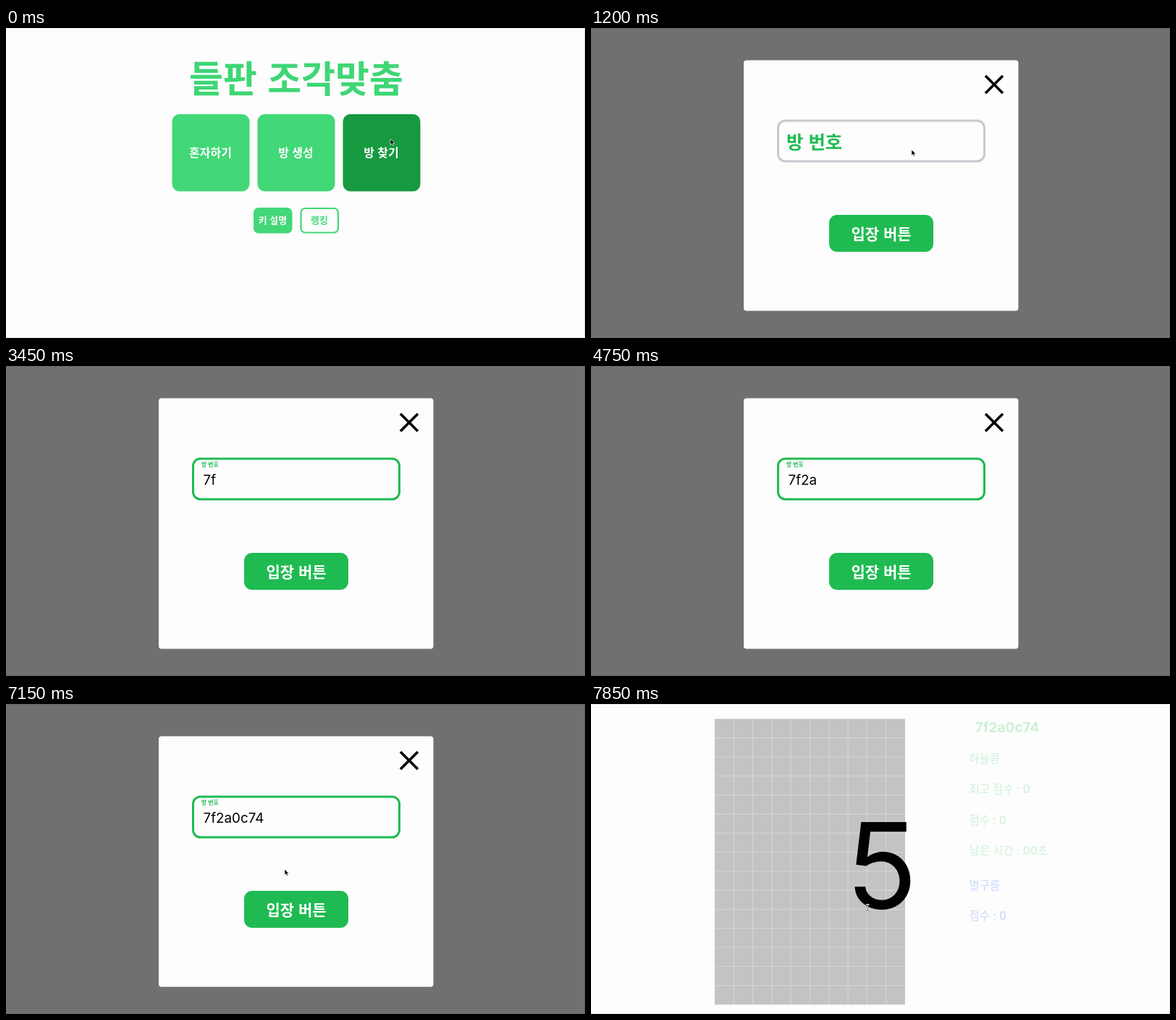
An HTML page for the animation above (8 s loop, 800 by 428 pixels).

```html
<!DOCTYPE html>
<html lang="ko">
<head>
<meta charset="utf-8">
<style>
  html, body { margin: 0; width: 100%; height: 100%; overflow: hidden; background: #fdfdfd; }
  svg { display: block; width: 100vw; height: 100vh; }
  text { font-family: "Noto Sans CJK KR", "Noto Sans CJK", "Noto Sans CJK JP", sans-serif; font-weight: 700; }
  .mid { text-anchor: middle; }
  .inter { font-family: Inter, "Noto Sans CJK KR", "Noto Sans CJK", "Noto Sans CJK JP", sans-serif; }
  .thin { font-weight: 400; }
  .info text { font-size: 15.5px; font-weight: 500; }
</style>
</head>
<body>
<svg viewBox="0 0 800 428">
  <rect width="800" height="428" fill="#fdfdfd"/>
  <path d="M0 .5H799.5V427.5H0" fill="none" stroke="#e6e6e6"/>

  <g id="home">
    <text class="mid" x="401" y="89" font-size="51" fill="#3fd675">들판 조각맞춤</text>
    <g fill="#42d777">
      <rect x="229.5" y="119" width="107" height="106.5" rx="10"/>
      <rect x="347.5" y="119" width="107" height="106.5" rx="10"/>
      <rect x="465.5" y="119" width="107" height="106.5" rx="10" fill="#16993f"/>
      <rect x="342" y="248" width="53.5" height="35.5" rx="7"/>
    </g>
    <rect x="407.5" y="249" width="51.5" height="33.5" rx="6" fill="none" stroke="#42d777" stroke-width="2.2"/>
    <g class="mid" fill="#fff" font-size="16">
      <text x="282.5" y="178">혼자하기</text>
      <text x="400.5" y="178">방 생성</text>
      <text x="518.5" y="178">방 찾기</text>
      <text x="368.5" y="270" font-size="13">키 설명</text>
      <text x="433" y="270" font-size="13" fill="#42d777">랭킹</text>
    </g>
  </g>

  <rect id="shade" width="800" height="428" fill="#000" fill-opacity=".555"/>
  <g id="dialog">
    <rect x="211" y="44.5" width="379.5" height="346" rx="4" fill="#fdfdfd"/>
    <path d="M545 66L569 90M569 66L545 90" stroke="#000" stroke-width="3.7"/>
    <rect id="field" x="258.5" y="128" width="285" height="56" rx="10" fill="none" stroke-width="3"/>
    <text id="label" x="270" fill="#1fbb52">방 번호</text>
    <text id="code" class="inter thin" x="272.5" y="164" font-size="18.8"></text>
    <rect id="enter" x="329" y="258" width="144" height="51" rx="11"/>
    <text class="mid" x="401" y="291.5" font-size="21" fill="#fff">입장 버튼</text>
  </g>

  <g id="game">
    <rect x="171" y="20.5" width="263" height="394.5" fill="#c3c3c3"/>
    <path id="grid" stroke="#d2d2d2" stroke-width="1.4"/>
    <g class="info" fill="#cdf0d8">
      <text class="inter" x="531" y="39" style="font-size:19px;font-weight:700">7f2a0c74</text>
      <text class="inter" x="522.5" y="81">하늘콩</text>
      <text class="inter" x="522.5" y="123">최고 점수 : 0</text>
      <text class="inter" x="522.5" y="165.5">점수 : 0</text>
      <text class="inter" x="522.5" y="207.5">남은 시간 : 00초</text>
      <g fill="#cbd8fc">
        <text class="inter" x="522.5" y="256">별구름</text>
        <text class="inter" x="522.5" y="298">점수 : 0</text>
      </g>
    </g>
    <text class="inter thin mid" x="402.5" y="281.5" font-size="163">5</text>
    <path d="M380 277h1.5l.7 .7 .7-.7h1.5M382.2 277.7v7.6M380 286h1.5l.7-.7 .7 .7h1.5" fill="none" stroke="#fff" stroke-width="2"/>
    <path d="M380 277h1.5l.7 .7 .7-.7h1.5M382.2 277.7v7.6M380 286h1.5l.7-.7 .7 .7h1.5" fill="none" stroke="#333" stroke-width=".8"/>
  </g>

  <path id="pointer" d="M0 0V8.3L1.9 6.6 3.1 9.4 4.6 8.8 3.4 6.1H6Z" stroke="#fff" stroke-width=".7"/>
</svg>
<script>
const LOOP = 8000, OPEN = 100, FOCUS = 1400, BLUR = 7600, GAME = 7800;
const CODE = '7f2a0c74';
const KEY_TIMES = [2420, 2950, 3550, 4150, 4920, 5400, 5900, 6250];
const PATH = [
  [0, 531, 153], [150, 531, 154], [450, 534, 188], [900, 534, 188], [1400, 394, 157],
  [1800, 394, 153], [6500, 394, 153], [7150, 385, 228], [7500, 380, 279], [LOOP, 380, 279]
];
const HIDE_POINTER = [2420, 6500];

const $ = id => document.getElementById(id);
const set = (id, attrs) => { for (const k in attrs) $(id).setAttribute(k, attrs[k]); };
const show = (id, on) => { $(id).style.display = on ? '' : 'none'; };
const lerp = (a, b, p) => a + (b - a) * p;
const ease = (t, start, length) => {
  const p = Math.min(1, Math.max(0, (t - start) / length));
  return p * p * (3 - 2 * p);
};
const mix = (a, b, p) => `rgb(${a.map((v, i) => Math.round(lerp(v, b[i], p)))})`;

const GRAY = [199, 201, 208], GREEN = [31, 187, 82], DARK = [22, 153, 63];

let lines = '';
for (let i = 1; i < 10; i++) lines += `M${171 + i * 26.3} 20.5v394.5`;
for (let i = 1; i < 15; i++) lines += `M171 ${20.5 + i * 26.3}h263`;
set('grid', { d: lines });

function pointerAt(t) {
  const i = PATH.findIndex(p => p[0] > t);
  const [t0, x0, y0] = PATH[i - 1], [t1, x1, y1] = PATH[i];
  const p = ease(t, t0, t1 - t0);
  return [lerp(x0, x1, p), lerp(y0, y1, p)];
}

function render(t) {
  const inGame = t >= GAME;
  const opened = ease(t, OPEN, 300);
  const focused = ease(t, FOCUS, 180), blurred = ease(t, BLUR, 100);
  const [x, y] = pointerAt(t);

  show('home', !inGame);
  show('shade', !inGame);
  show('dialog', !inGame);
  show('game', inGame);
  show('pointer', !inGame && (t < HIDE_POINTER[0] || t >= HIDE_POINTER[1]));

  set('shade', { opacity: opened });
  set('dialog', { opacity: opened, transform: `translate(0 ${-50 * (1 - opened)})` });
  set('field', { stroke: mix(GRAY, GREEN, focused * (1 - blurred)) });
  set('label', {
    'font-size': lerp(25.4, 7.8, focused) + 0.9 * blurred,
    y: lerp(166.5, 139, focused) + 3.2 * blurred
  });
  $('code').textContent = CODE.slice(0, KEY_TIMES.filter(k => k <= t).length);
  set('enter', { fill: mix(GREEN, DARK, y > 258 ? 1 : 0) });
  set('pointer', { transform: `translate(${x} ${y})` });
}

function frame() {
  render(performance.now() % LOOP);
  requestAnimationFrame(frame);
}
frame();
</script>
</body>
</html>
```
